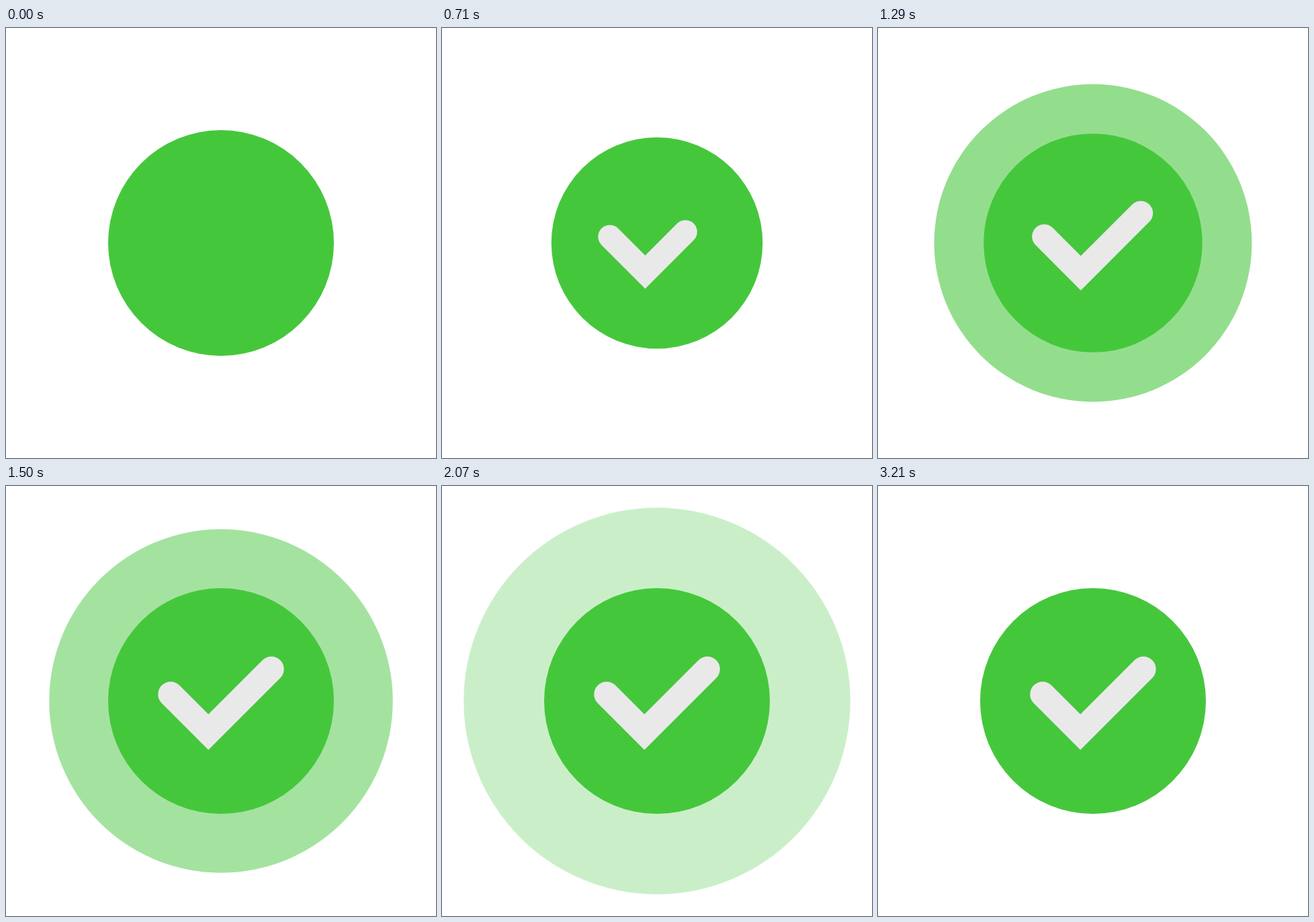
An HTML page with a canvas for the animation above (4780 ms loop, 640 by 640 pixels).

```html
<!DOCTYPE html>
<html>
<head>
<meta charset="utf-8">
<style>
html, body { margin: 0; height: 100%; overflow: hidden; background: #fff; }
canvas { display: block; }
</style>
</head>
<body>
<canvas id="stage" width="640" height="640"></canvas>
<script>
const ctx = document.getElementById('stage').getContext('2d');
const LOOP = 4780, FPS = 14;
const GREEN = '#45c73c';
const TICK_LENGTH = 150 * Math.SQRT2;

// Keys are [step, value] pairs, in steps of 1/14 s.
const scaleKeys = [[5.5, 1], [8.8, .905], [10, .936], [12.7, 1.088], [14, 1.027], [16.5, .955], [18, .969], [21, 1]];
const radiusKeys = [[12, 168], [14, 190], [18, 236.4], [21, 255.7], [25, 274.7], [29, 287.7], [34, 299.5], [37, 302.8], [38, 304.1]];
const alphaKeys = [[12, .81], [14, .726], [18, .58], [25, .38], [34, .167], [38, .08]];

// Smooth curve through the keys that never overshoots them.
function curve(keys, x) {
  const last = keys.length - 1;
  if (x <= keys[0][0]) return keys[0][1];
  if (x >= keys[last][0]) return keys[last][1];
  const rise = i => (keys[i + 1][1] - keys[i][1]) / (keys[i + 1][0] - keys[i][0]);
  const slope = i => {
    if (i === 0) return rise(0);
    if (i === last) return rise(last - 1);
    const a = rise(i - 1), b = rise(i);
    return a * b > 0 ? 2 * a * b / (a + b) : 0;
  };
  const i = keys.findIndex(k => k[0] > x) - 1;
  const [x0, y0] = keys[i], [x1, y1] = keys[i + 1];
  const w = x1 - x0, u = (x - x0) / w, v = 1 - u;
  return y0 * v * v * (1 + 2 * u) + y1 * u * u * (1 + 2 * v)
    + w * u * v * (slope(i) * v - slope(i + 1) * u);
}

function disc(radius) {
  ctx.fillStyle = GREEN;
  ctx.beginPath();
  ctx.arc(0, 0, radius, 0, 2 * Math.PI);
  ctx.fill();
}

function tick(progress) {
  ctx.strokeStyle = '#e9e9e9';
  ctx.lineWidth = 37.4;
  ctx.lineCap = 'round';
  ctx.setLineDash(progress < 1 ? [progress * TICK_LENGTH, 2 * TICK_LENGTH] : []);
  ctx.beginPath();
  ctx.moveTo(-75, -10);
  ctx.lineTo(-18.75, 46.25);
  ctx.lineTo(75, -47.5);
  ctx.stroke();
}

function draw(now) {
  const step = Math.floor((now % LOOP + 5) * FPS / 1000);
  ctx.setTransform(1, 0, 0, 1, 0, 0);
  ctx.clearRect(0, 0, 640, 640);
  ctx.translate(320, 320);

  if (step >= 12 && step < 45) {
    ctx.globalAlpha = curve(alphaKeys, step);
    disc(curve(radiusKeys, step));
    ctx.globalAlpha = 1;
  }

  const scale = curve(scaleKeys, step);
  ctx.scale(scale, scale);
  disc(168);
  if (step >= 6) tick(step < 21 ? 1 - Math.exp(-.367 * (step - 5.6)) : 1);
}

const start = performance.now();
function frame() {
  draw(performance.now() - start);
  requestAnimationFrame(frame);
}
frame();
</script>
</body>
</html>
```
